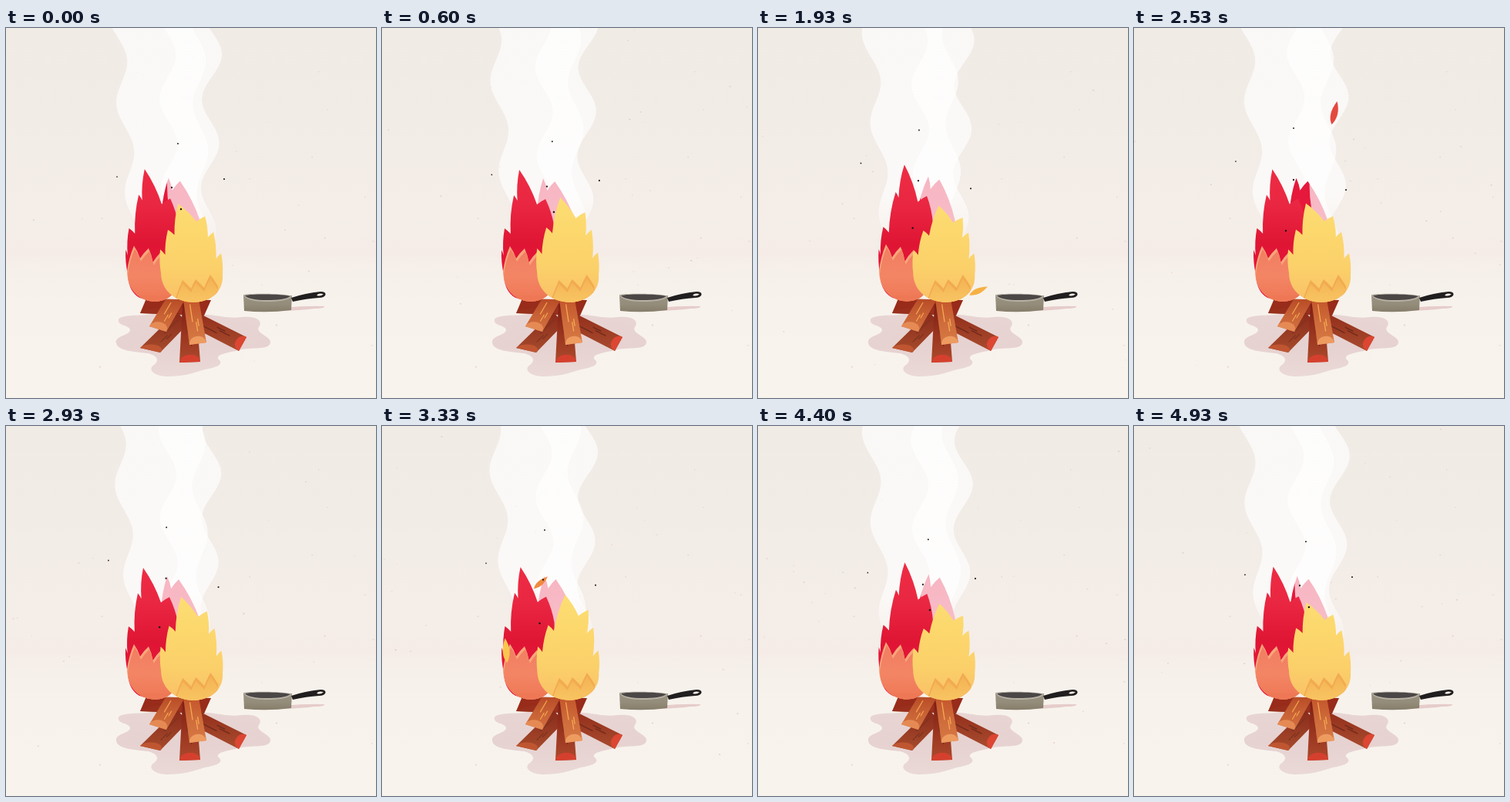
Animation, 480 px wide and 480 px high, one loop 4.99 s. Source, as an HTML page with a canvas:

```html
<!DOCTYPE html>
<html lang="en">
<head>
<meta charset="utf-8">
<title>Campfire</title>
<style>
html, body { margin: 0; width: 100%; height: 100%; overflow: hidden; background: #f3eee8; }
canvas { display: block; width: 100vw; height: 100vh; }
</style>
</head>
<body>
<canvas id="stage" width="480" height="480"></canvas>
<script>
const ctx = document.getElementById('stage').getContext('2d');
const LOOP = 4990, STEPS = 75, TAU = Math.PI * 2;
const wave = turns => Math.cos(TAU * turns);

function rng(seed) {
  return () => {
    seed = (seed * 1664525 + 1013904223) >>> 0;
    return seed / 4294967296;
  };
}

// Smooth bump from 0 to 1 and back, centred on a time in the loop
function pulse(t, at, span) {
  const gap = Math.abs(t - at);
  const u = Math.min(gap, LOOP - gap) / span;
  return u < 0.5 ? 0.5 + 0.5 * wave(u) : 0;
}

function gradient(y0, y1, ...colors) {
  const g = ctx.createLinearGradient(0, y0, 0, y1);
  colors.forEach((c, i) => g.addColorStop(i / (colors.length - 1), c));
  return g;
}

function fill(path, color) {
  ctx.fillStyle = color;
  ctx.fill(path);
}

const shape = d => new Path2D(d);

function clipped(path, draw) {
  ctx.save();
  ctx.clip(path);
  draw();
  ctx.restore();
}

function dot(x, y, r) {
  ctx.beginPath();
  ctx.arc(x, y, r, 0, TAU);
  ctx.fill();
}

// ---- background ----
function specks(seed, count) {
  const r = rng(seed);
  for (let i = 0; i < count; i++) {
    const x = r() * 480, y = r() * 440, size = 0.5 + r() * 0.6;
    ctx.fillStyle = r() < 0.5 ? 'rgba(228,190,190,.6)' : 'rgba(200,190,182,.6)';
    ctx.fillRect(x, y, size * 2, size * 1.5);
  }
}

function background(step) {
  ctx.fillStyle = gradient(0, 480, '#f1ebe6', '#f2ece7', '#f4ede8', '#f7f2ec', '#f8f4ed');
  ctx.fillRect(0, 0, 480, 480);
  ctx.fillStyle = gradient(250, 335, 'rgba(245,232,228,0)', 'rgba(245,232,228,.45)', 'rgba(247,241,235,0)');
  ctx.fillRect(0, 250, 480, 85);
  specks(41, 16);
  specks(900 + Math.floor(step / 4) * 7919, 22);
}

// ---- smoke ----
function ribbon(left, right) {
  const p = new Path2D();
  for (let y = 0; y <= 288; y += 4) p.lineTo(left(y), y);
  for (let y = 288; y >= 0; y -= 4) p.lineTo(right(y), y);
  const white = 'rgba(255,255,255,.68)';
  fill(p, gradient(0, 290, white, white, white, white, 'rgba(255,255,255,.05)'));
}

function smoke(k) {
  const swing = y => wave((y - 150) / 115 + 3 * k);
  const back = y => 144 + y * 0.085 - (10 - y * 0.008) * wave((y - 100) / 117 + 2 * k);
  ribbon(back, y => back(y) + 104 - y * 0.05);
  ribbon(y => 209 + y * 0.015 + 11 * swing(y), y => 268 - y * 0.02 + (13 - y * 0.01) * swing(y));
}

// ---- flames ----
// A notch is cut beside the lower of each two neighbouring tips.
function jagged(start, tips, end, depth) {
  const pts = [start, tips[0]];
  for (let i = 1; i < tips.length; i++) {
    const pair = [tips[i - 1], tips[i]].sort((a, b) => b[1] - a[1]);
    const [low, high] = pair, dx = high[0] - low[0];
    pts.push([low[0] + Math.sign(dx) * Math.min(11, Math.abs(dx) * 0.65), low[1] + depth], tips[i]);
  }
  return [...pts, end];
}

// Clockwise outline with bulging edges and a round base of the given depth
function flame(points, belly, bend, bow = 0.07) {
  const pts = points.map(bend);
  const p = new Path2D();
  p.moveTo(...pts[0]);
  for (let i = 1; i < pts.length; i++) {
    const [ax, ay] = pts[i - 1], [bx, by] = pts[i];
    p.quadraticCurveTo((ax + bx) / 2 + (by - ay) * bow, (ay + by) / 2 - (bx - ax) * bow, bx, by);
  }
  const first = pts[0], last = pts[pts.length - 1];
  p.bezierCurveTo(last[0] + 3, belly, first[0] + 1, belly, ...first);
  p.closePath();
  return p;
}

// Shift that grows from the base to the tip
const bender = (bottom, top, power, dx, dy) => ([x, y]) => {
  const h = Math.max(0, (bottom - y) / (bottom - top)) ** power;
  return [x + dx * h, y + dy * h];
};

const RED = jagged([158, 320], [[155, 288], [159, 260], [171, 217], [178, 184], [212, 222]], [223, 255], 7);
const PINK = jagged([201, 240], [[209, 195], [224, 199]], [251, 250], 12);
const ORANGE = jagged([157, 316], [[166, 283], [185, 286], [201, 291]], [222, 325], 13);
const YELLOW = jagged([201, 318], [[200, 287], [210, 261], [223, 226], [258, 243], [269, 264], [279, 292]], [281, 320], 7);
const CROWN = jagged([220, 350], [[229, 327], [246, 326], [265, 320]], [275, 335], 11);

function leaf(x, y, degrees, length, width, color) {
  ctx.save();
  ctx.translate(x, y);
  ctx.rotate(degrees * Math.PI / 180);
  ctx.scale(length / 2, width / 2);
  fill(shape('M-1 0Q-.3 -2 1 0Q-.1 2 -1 0Z'), color);
  ctx.restore();
}

function backFlames(t, lean) {
  const pink = flame(PINK, 330, bender(310, 195, 1.5, 14 * lean, -3 * lean));
  fill(pink, gradient(195, 300, '#f7b5c2', '#f7bcc7', '#f4a5b3'));

  const cover = 9 * pulse(t, 0, 500) + 24 * pulse(t, 1200, 700) + 28 * pulse(t, 2530, 700);
  const x = 200 + 14 * lean + cover;
  clipped(pink, () => fill(shape(`M190 180H${x}Q${x - 6} 222 ${x + 8} 262L190 300Z`), '#e6183b'));

  const red = flame(RED, 370, bender(350, 184, 2, 14 * lean, -8 * lean));
  fill(red, gradient(178, 330, '#ee2c43', '#ea2742', '#df1534', '#e9153b'));

  const size = pulse(t, 1200, 700);
  leaf(222, 242, -78, 98 * size, 34 * size, '#f7bcc7');
}

function frontFlames(p, lean) {
  const orange = flame(ORANGE, 366, bender(352, 283, 2, 0, -3 * lean));
  fill(orange, '#f8a67a');
  clipped(orange, () => {
    ctx.translate(1, 4);
    fill(orange, gradient(284, 352, '#f17e61', '#f38565', '#ee7654'));
    ctx.translate(-1, -4);
    ctx.fillStyle = '#ee7855';
    ctx.fillRect(165, 347, 60, 12);
  });

  const dx = 11 * (1 - wave(p - 0.03)), dy = 6 * wave(p - 0.83) - 1;
  const yellow = flame(YELLOW, 368, bender(355, 226, 3, dx, dy));
  fill(yellow, gradient(225, 355, '#fcdd72', '#fcd76c', '#fbd06a', '#f9c066'));
  const crown = flame(CROWN, 372, ([x, y]) => [x + dx * 0.06, y], 0.03);
  clipped(yellow, () => {
    fill(crown, '#f2ab50');
    ctx.clip(crown);
    ctx.translate(0, 5);
    fill(crown, gradient(322, 355, '#f4b456', '#f9c764'));
  });
}

// ---- loose flickers: time, centre, angle, length, colour ----
const FLICKERS = [
  [1200, 168, 206, -43, 23, '#df2338'],
  [1200, 174, 316, -130, 36, '#fbc252'],
  [1200, 251, 239, -115, 18, '#e0203a'],
  [1930, 286, 341, -25, 26, '#f6b043'],
  [2530, 260, 110, -77, 31, '#e5483f'],
  [3330, 206, 203, -42, 24, '#f08a3f'],
  [3330, 161, 291, -95, 32, '#fbc64f'],
  [3930, 158, 250, -143, 34, '#dd6d2c'],
  [3930, 257, 183, -126, 19, '#f0914a']
];

function flickers(t) {
  for (const [at, x, y, degrees, length, color] of FLICKERS) {
    const size = Math.sqrt(pulse(t, at, 450));
    if (size) leaf(x, y - (t - at) * 0.07, degrees, length * size, length * size * 0.28, color);
  }
}

// ---- embers: home and reach of one slow swing per loop ----
const EMBERS = [
  [138, 183, 6, 10], [215, 140, 8, 10], [279, 203, 4, -7], [211, 202, 4, 5], [212, 249, 15, -14]
];

function embers(k, t) {
  ctx.fillStyle = '#1d1517';
  EMBERS.forEach(([x, y, dx, dy], i) => {
    const fade = i < 3 ? 1 - pulse(t, 1200, 900) : 1;
    dot(x + dx * wave(k), y + dy * wave(k), (0.85 + i * 0.1) * fade);
  });
}

// ---- still parts ----
function shadow() {
  fill(shape('M146 378C150 371 175 374 190 371L262 372C282 374 290 377 306 375C325 373 334 380 328 388' +
    'C323 396 344 400 343 408C341 419 318 413 302 418C288 421 270 424 276 430C284 437 270 441 258 443' +
    'C242 448 230 452 210 452C192 452 183 443 192 437C200 431 196 425 184 422C166 420 144 419 143 408' +
    'C142 399 160 399 161 392C161 385 144 387 146 378Z'), gradient(371, 452, '#e8d5d3', '#e6d2d1', '#ead9d6'));
}

// Corners run from the cut end along the log and back to the cut end.
function log(corners, color, endColor, grain) {
  const [a, b, c, d] = corners;
  const mix = (p, q, u) => [p[0] + (q[0] - p[0]) * u, p[1] + (q[1] - p[1]) * u];
  const toward = (p, q) => mix(p, q, 13 / Math.hypot(q[0] - p[0], q[1] - p[1]));
  fill(shape(`M${corners.join('L')}Z`), color);
  fill(shape(`M${a}C${toward(a, b)} ${toward(d, c)} ${d}Z`), endColor);
  ctx.strokeStyle = grain;
  ctx.lineWidth = 1.3;
  ctx.lineCap = 'round';
  for (const [across, from, to] of [[0.38, 0.5, 0.88], [0.6, 0.28, 0.48], [0.72, 0.4, 0.55]]) {
    const at = along => mix(mix(a, b, along), mix(d, c, along), across);
    ctx.stroke(shape(`M${at(from)}L${at(to)}`));
  }
}

function logs() {
  log([[174, 370], [182, 351], [266, 353], [257, 373]], '#982b1a', '#98301d', 'transparent');
  log([[174, 415], [190, 390], [222, 368], [236, 384], [200, 421]].filter((_, i) => i !== 1),
    gradient(370, 420, '#8a2b1b', '#a64b2c'), '#bf5631', '#7d3420');
  log([[302, 419], [234, 384], [250, 370], [312, 401]], gradient(372, 415, '#942f1c', '#a64a2d'), '#dc4632', '#6f2a1b');
  log([[225, 434], [229, 358], [246, 358], [252, 433]], gradient(362, 434, '#7f2015', '#9a3520', '#ab4a2c'), '#d5402e', '#7a2c1b');
  log([[186, 387], [207, 352], [232, 352], [208, 394]], gradient(354, 394, '#b94e28', '#c96336', '#d1703f'), '#e58a54', '#f0a24e');
  log([[238, 411], [230, 352], [250, 352], [260, 408]], gradient(354, 411, '#c4572c', '#cf6c3b', '#d67a45'), '#ee9b60', '#f3aa55');
}

function pan() {
  fill(shape('M360 363Q390 360 413 361Q414 364 400 364Q385 366 360 367Z'), '#e6cccb');
  fill(shape('M308 346L309 367Q340 370 370 366L371 347Z'), gradient(347, 369, '#9a9383', '#958d7b', '#857c69'));
  fill(shape('M308 346C315 344 364 344 371 348C366 354 352 355 338 355C322 355 310 352 308 346Z'), '#b9b3a5');
  fill(shape('M310 347C320 344.5 362 345 369 348C364 352 352 353 338 353C324 353 313 351 310 347Z'), '#4b4747');
  fill(shape('M370 350Q388 344 408 342Q415 342 414.5 346Q413 350 406 350Q390 351 372 355Z'), '#211e1f');
  leaf(407.5, 346, -9, 9, 3, '#f3ece6');
}

function draw(now) {
  const step = Math.floor((now % LOOP) / LOOP * STEPS);
  const k = step / STEPS, t = k * LOOP, p = (2 * k) % 1;
  const lean = (0.5 - 0.5 * wave(p - 0.17)) ** 1.5;
  background(step);
  shadow();
  pan();
  smoke(k);
  logs();
  backFlames(t, lean);
  frontFlames(p, lean);
  flickers(t);
  embers(k, t);
}

const start = performance.now();
function tick() {
  draw(performance.now() - start);
  requestAnimationFrame(tick);
}
tick();
</script>
</body>
</html>
```
